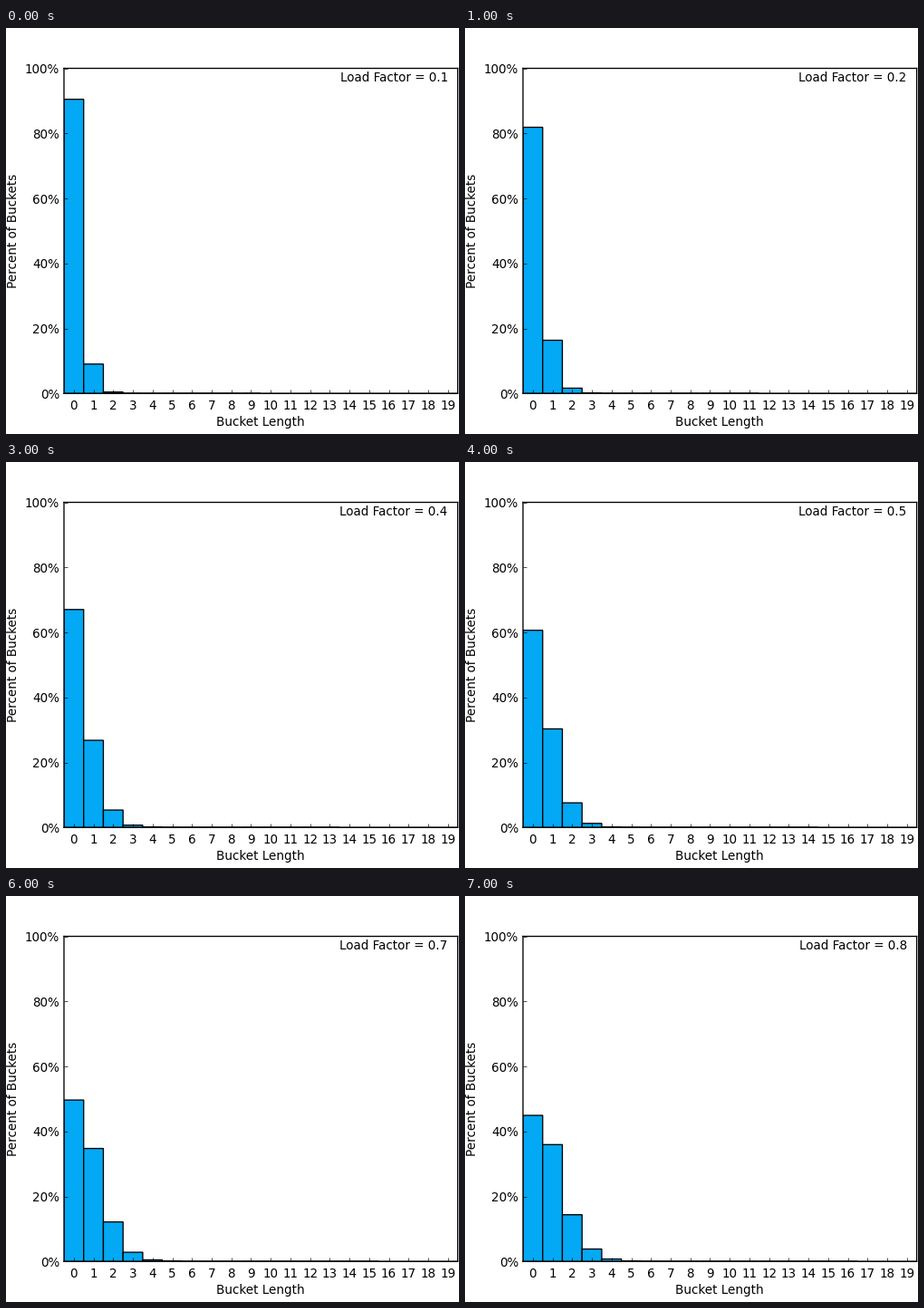
Animation, 500 px wide and 448 px high, one loop 8 s. Source, as a matplotlib script:

```python
import math

import matplotlib.pyplot as plt
from matplotlib.animation import FuncAnimation

W, H, DPI = 500, 448, 80
LEFT, RIGHT, TOP, BOTTOM = 64, 498.6, 44.5, 403.3  # plot box in pixels from the top left
LINE = 1.2
BUCKETS = range(20)
FRAMES = 8

plt.rcParams.update({
    "font.family": "DejaVu Sans",
    "font.size": 12.2,
    "axes.linewidth": LINE,
    "axes.axisbelow": False,
    "savefig.dpi": "figure",
})


def poisson(k, load):
    return math.exp(-load) * load ** k / math.factorial(k)


def label(x, y, text, **style):
    fig.text(x / W, 1 - y / H, text, ha="center", va="baseline", **style)


fig = plt.figure(figsize=(W / DPI, H / DPI), dpi=DPI, facecolor="white")
ax = fig.add_axes([LEFT / W, 1 - BOTTOM / H, (RIGHT - LEFT) / W, (BOTTOM - TOP) / H])
ax.set_xlim(-0.5, 19.5)
ax.set_ylim(0, 1)
ax.set_xticks(BUCKETS)
ax.set_yticks([p / 100 for p in range(0, 101, 20)],
              [f"{p}%" for p in range(0, 101, 20)])
ax.tick_params(direction="in", length=4, width=0.6)
ax.tick_params(axis="x", pad=6)
ax.tick_params(axis="y", pad=4.5)
for spine in ax.spines.values():
    spine.set_snap(False)

label((LEFT + RIGHT) / 2, 439, "Bucket Length")
label(12, (TOP + BOTTOM) / 2, "Percent of Buckets",
      rotation=90, rotation_mode="anchor")

bars = ax.bar(BUCKETS, [0] * len(BUCKETS), width=1, snap=False,
              color="#03A9F4", edgecolor="black", linewidth=LINE)
caption = ax.text(19, 0.96, "", ha="right", va="baseline")


def update(frame):
    load = (frame + 1) / 10
    for k, bar in zip(BUCKETS, bars):
        bar.set_height(poisson(k, load))
    caption.set_text(f"Load Factor = {load:.1f}")
    return [*bars, caption]


anim = FuncAnimation(fig, update, frames=FRAMES, interval=1000,
                     repeat=True, repeat_delay=0)
plt.show()
```
